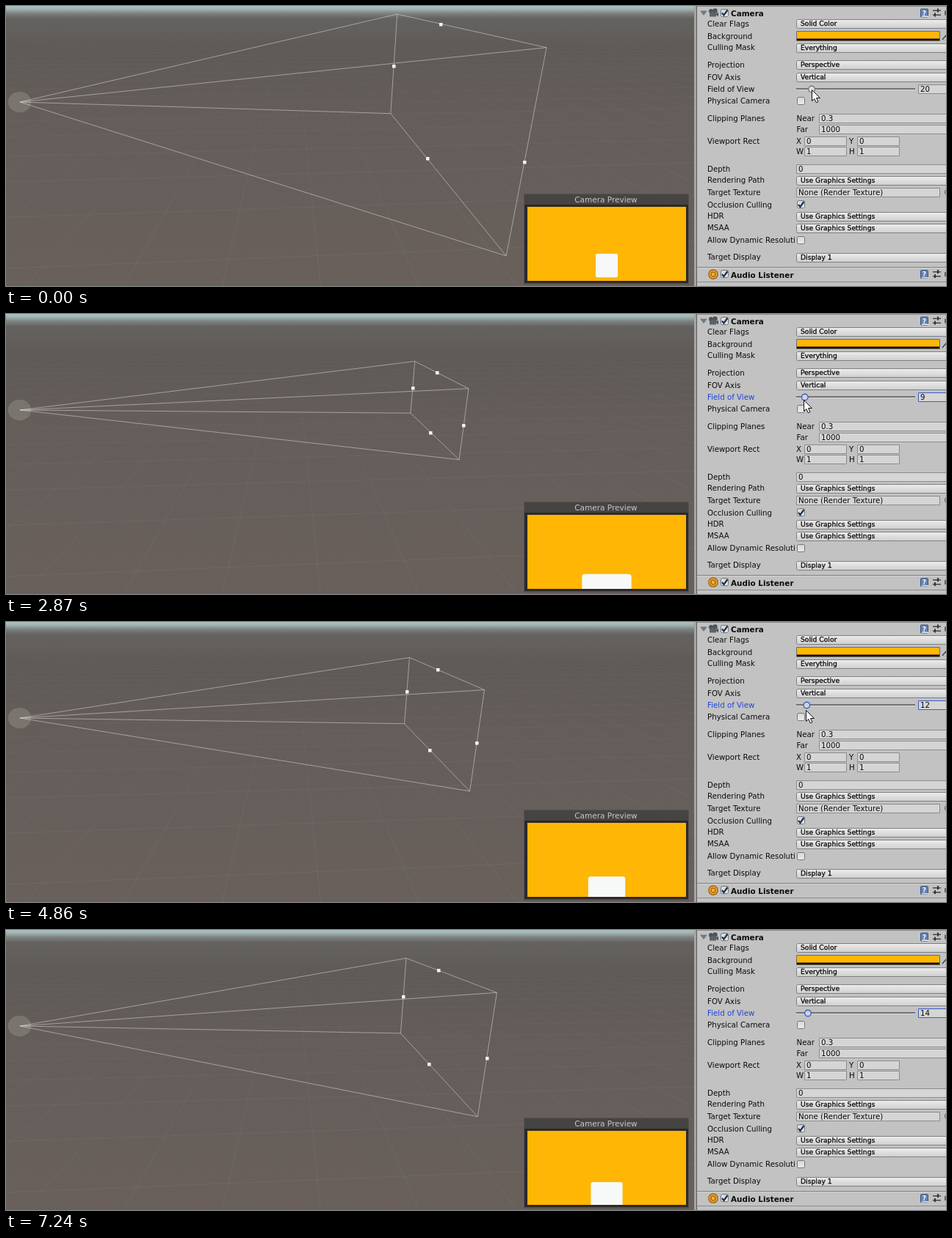
These frames come from a looping animation (1280 px wide and 382 px high, 7.52 s). An HTML page with a canvas:

```html
<!DOCTYPE html>
<html lang="en">
<head>
<meta charset="utf-8">
<title>Field of view</title>
<style>
html, body { margin: 0; width: 100%; height: 100%; overflow: hidden; background: #c2c2c2; }
canvas { display: block; width: 1280px; height: 382px; }
</style>
</head>
<body>
<canvas id="stage" width="1280" height="382"></canvas>
<script>
const ctx = document.getElementById('stage').getContext('2d');
const LOOP = 7520, SCENE_W = 937, EPS = 0.01;
const FONT = '"DejaVu Sans", sans-serif';

// [time, field of view, displayed value when it lags behind]
const KEYS = [
  [0, 20], [650, 26], [800, 32], [920, 39], [1040, 45], [1160, 49], [1310, 50],
  [1460, 44], [1580, 35], [1700, 26], [1850, 15], [1970, 6, 7], [2120, 4], [2240, 2],
  [2360, 1e-5], [2480, 1e-5], [2600, 2], [2720, 5], [2870, 9], [2990, 13], [3110, 16],
  [3260, 21], [3410, 26], [3530, 28], [3650, 29], [3930, 21], [4080, 16], [4200, 13],
  [4320, 11], [4440, 10], [4740, 11], [4860, 12], [5010, 15], [5130, 19], [5250, 22],
  [5550, 20], [5670, 18], [5790, 19], [5910, 22], [6060, 25], [6460, 22], [6580, 19],
  [6700, 16], [6820, 14]
];

function rect(x, y, w, h, fill) {
  ctx.fillStyle = fill;
  ctx.fillRect(x, y, w, h);
}

function path(points, { fill, stroke, width = 1, close = true }) {
  ctx.beginPath();
  points.forEach(([x, y]) => ctx.lineTo(x, y));
  if (close) ctx.closePath();
  if (fill) { ctx.fillStyle = fill; ctx.fill(); }
  if (stroke) { ctx.strokeStyle = stroke; ctx.lineWidth = width; ctx.stroke(); }
}

function ellipse(x, y, rx, ry, fill, stroke, width = 1) {
  ctx.beginPath();
  ctx.ellipse(x, y, rx, ry, 0, 0, 7);
  if (fill) { ctx.fillStyle = fill; ctx.fill(); }
  if (stroke) { ctx.strokeStyle = stroke; ctx.lineWidth = width; ctx.stroke(); }
}

function text(str, x, y, size = 10.25, color = '#0c0c0c', weight = '', align = 'left') {
  ctx.font = `${weight} ${size}px ${FONT}`;
  ctx.fillStyle = color;
  ctx.textAlign = align;
  ctx.textBaseline = 'alphabetic';
  ctx.fillText(str, x, y + 4);
}

function gradient(y0, y1, stops) {
  const g = ctx.createLinearGradient(0, y0, 0, y1);
  stops.forEach(([at, color]) => g.addColorStop(at, color));
  return g;
}

function box(x, y, w, h, fill, border, radius = 0) {
  ctx.beginPath();
  ctx.roundRect(x + .5, y + .5, w - 1, h - 1, radius);
  ctx.fillStyle = fill;
  ctx.fill();
  ctx.strokeStyle = border;
  ctx.lineWidth = 1;
  ctx.stroke();
}

// ---- Scene view ----

function drawGround() {
  rect(0, 0, SCENE_W, 382, gradient(0, 382, [
    [0, '#adc2c2'], [.012, '#9fb0b0'], [.026, '#7c8280'], [.045, '#646260'],
    [.14, '#5f5a56'], [.4, '#645d59'], [1, '#69605c']
  ]));
  const line = (x0, y0, x1, y1, alpha) =>
    path([[x0, y0], [x1, y1]], { stroke: `rgba(132,136,134,${alpha})`, close: false });
  // Both grid directions vanish on the horizon, at y = -21.
  for (let n = 0; n < 28; n++) {
    const depth = 1 / (1 / 379 + n * 5.95e-4);
    line(0, depth - 21, 9300, -21, Math.min(.2, depth / 1300));
  }
  const fade = gradient(0, 382, [
    [.05, 'rgba(132,136,134,0)'], [.4, 'rgba(132,136,134,.12)'], [1, 'rgba(132,136,134,.22)']
  ]);
  for (let k = -16; k < 20; k++) {
    path([[388, -21], [388 + (k + .3) * 134, 382]], { stroke: fade, close: false });
  }
}

// Homogeneous far-plane point; a and b run from -1 to 1 across the view.
function farPoint(s, a, b) {
  return [582.5 - s * (853 * a + 142 * b),
          121.8 + s * (47 * a - 560 * b),
          1 - s * (2.2 * a + .335 * b)];
}

const project = ([x, y, w]) => [x / w, y / w];

function line3d(p, q) {
  if (p[2] < EPS && q[2] < EPS) return;
  const clip = (from, to) => {
    if (from[2] >= EPS) return from;
    const k = (EPS - from[2]) / (to[2] - from[2]);
    return from.map((v, i) => v + (to[i] - v) * k);
  };
  path([project(clip(p, q)), project(clip(q, p))],
    { stroke: 'rgba(222,219,216,.6)', width: .9, close: false });
}

function drawFrustum(s) {
  const apex = [19, 131, 1];
  const corners = [[-1, 1], [1, 1], [1, -1], [-1, -1]].map(([a, b]) => farPoint(s, a, b));
  ellipse(18.5, 131, 15.8, 14.3, 'rgba(150,148,142,.42)');
  corners.forEach((corner, i) => {
    line3d(apex, corner);
    line3d(corner, corners[(i + 1) % 4]);
  });
  for (const [a, b] of [[0, 1], [1, 0], [0, -1], [-1, 0]]) {
    const p = farPoint(s, a, b);
    if (p[2] < EPS) continue;
    const [x, y] = project(p);
    rect(Math.round(x) - 2, Math.round(y) - 2, 4.5, 4.5, '#f2f1ef');
  }
}

function drawPreview(s) {
  rect(705, 256, 225, 124, 'rgba(30,28,27,.2)');
  rect(706, 257, 223, 121, 'rgba(42,40,39,.96)');
  rect(706, 257, 223, 14, '#464443');
  text('Camera Preview', 817, 264, 10.5, '#c9c9c9', '', 'center');
  rect(710, 274, 216, 101, '#ffb605');
  const w = 5.3 / s, top = 324.5 + 2.385 / s, bottom = 324.5 + 8.05 / s;
  if (top >= 375) return;
  ctx.save();
  ctx.beginPath();
  ctx.rect(710, 274, 216, 101);
  ctx.clip();
  ctx.beginPath();
  ctx.roundRect(818 - w / 2, top, w, bottom - top, w * .06);
  ctx.fillStyle = '#f7f9f8';
  ctx.fill();
  ctx.restore();
}

// ---- Inspector ----

function dropdown(label, y) {
  box(1076, y - 6, 220, 13, gradient(y - 6, y + 7, [[0, '#eeeeee'], [1, '#cdcdcd']]), '#808080', 2);
  text(label, 1082, y - 1, 9.2);
  // A hairline outline gives the small labels their heavier weight.
  ctx.strokeStyle = '#0c0c0c';
  ctx.lineWidth = .3;
  ctx.strokeText(label, 1082, y + 3);
}

function field(value, x, y, w, border = '#8b8b8b') {
  box(x, y - 6, w, 13, '#d5d5d5', border);
  text(value, x + 3, y);
}

function checkbox(x, y, checked) {
  box(x, y - 5.5 | 0, 11, 11, gradient(y - 5, y + 6, [[0, '#d6d6d6'], [1, '#f0f0f0']]), '#747474', 2);
  if (checked) {
    path([[x + 2, y], [x + 4.5, y + 3], [x + 9.5, y - 4]],
      { stroke: '#17305a', width: 2.2, close: false });
  }
}

function drawHeader(title, y) {
  checkbox(973, y, true);
  text(title, 987, y + .5, 10.45, '#0c0c0c', 'bold');
  box(1245, y - 6, 11, 12, '#6383b4', '#3b527c', 1);
  rect(1247, y + 4, 9, 1.5, '#e4e8ee');
  text('?', 1250.5, y - 1, 8.5, '#ffffff', 'bold', 'center');
  rect(1262, y - 4, 11, 1.5, '#444');
  rect(1262, y + 2, 11, 1.5, '#444');
  rect(1268, y - 6, 2, 5, '#333');
  rect(1264, y, 2, 5, '#333');
  rect(1278, y - 3, 2, 6, '#666');
}

const LABELS = {
  'Clear Flags': 24, 'Background': 41, 'Culling Mask': 56, 'Projection': 80, 'FOV Axis': 97,
  'Physical Camera': 129, 'Clipping Planes': 153, 'Viewport Rect': 184, 'Depth': 222,
  'Rendering Path': 237, 'Target Texture': 254, 'Occlusion Culling': 271, 'HDR': 286,
  'MSAA': 302, 'Allow Dynamic Resoluti': 319, 'Target Display': 342
};

function drawInspector() {
  rect(SCENE_W, 0, 4, 382, '#a4a4a4');
  rect(940, 0, 1, 382, '#5a5a5a');
  rect(941, 0, 339, 382, '#c2c2c2');
  rect(941, 0, 339, 1, '#8b8b8b');
  rect(941, 356, 339, 1, '#7f7f7f');
  rect(941, 357, 339, 1, '#d4d4d4');
  rect(941, 376, 339, 1, '#8b8b8b');

  path([[945, 6.5], [955, 6.5], [950, 13]], { fill: '#777' });
  ellipse(960, 7, 3, 3, '#4b545a');
  ellipse(965.5, 6.5, 3.2, 3.2, '#4b545a');
  rect(958, 8.5, 9, 6, '#58636a');
  path([[966, 11], [970, 8.5], [970, 14.5]], { fill: '#4b545a' });
  drawHeader('Camera', 9.5);
  ellipse(963, 366, 6.3, 6.3, '#e09a28', '#a0681a', 1.2);
  ellipse(963, 366, 3, 3, '#f0b03a', '#8f5c14');
  drawHeader('Audio Listener', 366);

  for (const label in LABELS) text(label, 955, LABELS[label]);
  dropdown('Solid Color', 24);
  dropdown('Everything', 57);
  dropdown('Perspective', 80);
  dropdown('Vertical', 97);
  for (const y of [238, 287, 303]) dropdown('Use Graphics Settings', y);
  dropdown('Display 1', 343);

  box(1076, 34, 196, 14, '#ffb605', '#6b6b6b');
  rect(1077, 44.5, 194, 2.5, '#151005');
  path([[1275, 46], [1281, 39]], { stroke: '#444', width: 1.5, close: false });

  for (const [label, y, value] of [['Near', 153, '0.3'], ['Far', 168, '1000']]) {
    text(label, 1076.5, y);
    field(value, 1107, y, 190);
  }
  for (const [label, x, y, value] of [
    ['X', 1076, 184, '0'], ['Y', 1148, 184, '0'], ['W', 1076, 198, '1'], ['H', 1148, 198, '1']
  ]) {
    text(label, x, y);
    field(value, x + 11, y, 58);
  }
  field('0', 1076, 222, 220);
  field('None (Render Texture)', 1076, 254, 196);
  ellipse(1283, 254, 4.5, 4.5, null, '#555');
  checkbox(1077, 129.5, false);
  checkbox(1077, 271, true);
  checkbox(1077, 320, false);
}

function drawSlider(value, active) {
  text('Field of View', 955, 113, 10.25, active ? '#1c46d8' : '#0c0c0c');
  rect(1076, 112, 162, 2, '#747474');
  rect(1076, 114, 162, 1, '#dadada');
  ellipse(1080.2 + .844 * value, 113.5, 4.3, 4.3,
    active ? '#ccd3e4' : '#e4e4e4', active ? '#3f5fc4' : '#777', 1.4);
  field(value < 1 ? '1E-05' : value, 1242, 113, 50, active ? '#3c5cd0' : '#8b8b8b');
}

function cursorAt(t, value) {
  if (t >= 7240) return null;
  if (t >= 7090) return [1229, 346];
  if (t >= 6970) return [1136, 186];
  return [1077 + Math.round(value), t < 650 ? 114 : t < 4400 ? 117 : 120];
}

function drawCursor([x, y]) {
  const shape = [[0, 0], [0, 15], [3.4, 12], [5.8, 17.3], [8.4, 16.2], [6, 11], [10.8, 11]];
  path(shape.map(([dx, dy]) => [x + dx + .5, y + dy + .5]), { fill: '#fff', stroke: '#111' });
}

function draw(now) {
  const t = now % LOOP;
  const [, fov, lagging] = KEYS.findLast(key => key[0] <= t);
  const value = lagging ?? fov;
  const s = Math.tan(fov * Math.PI / 360);

  ctx.clearRect(0, 0, 1280, 382);
  ctx.save();
  ctx.beginPath();
  ctx.rect(0, 0, SCENE_W, 382);
  ctx.clip();
  drawGround();
  drawFrustum(s);
  drawPreview(s);
  ctx.restore();
  drawInspector();
  drawSlider(value, t >= 650);
  const cursor = cursorAt(t, value);
  if (cursor) drawCursor(cursor);
}

const start = performance.now();
function tick() {
  draw(performance.now() - start);
  requestAnimationFrame(tick);
}
tick();
</script>
</body>
</html>
```
